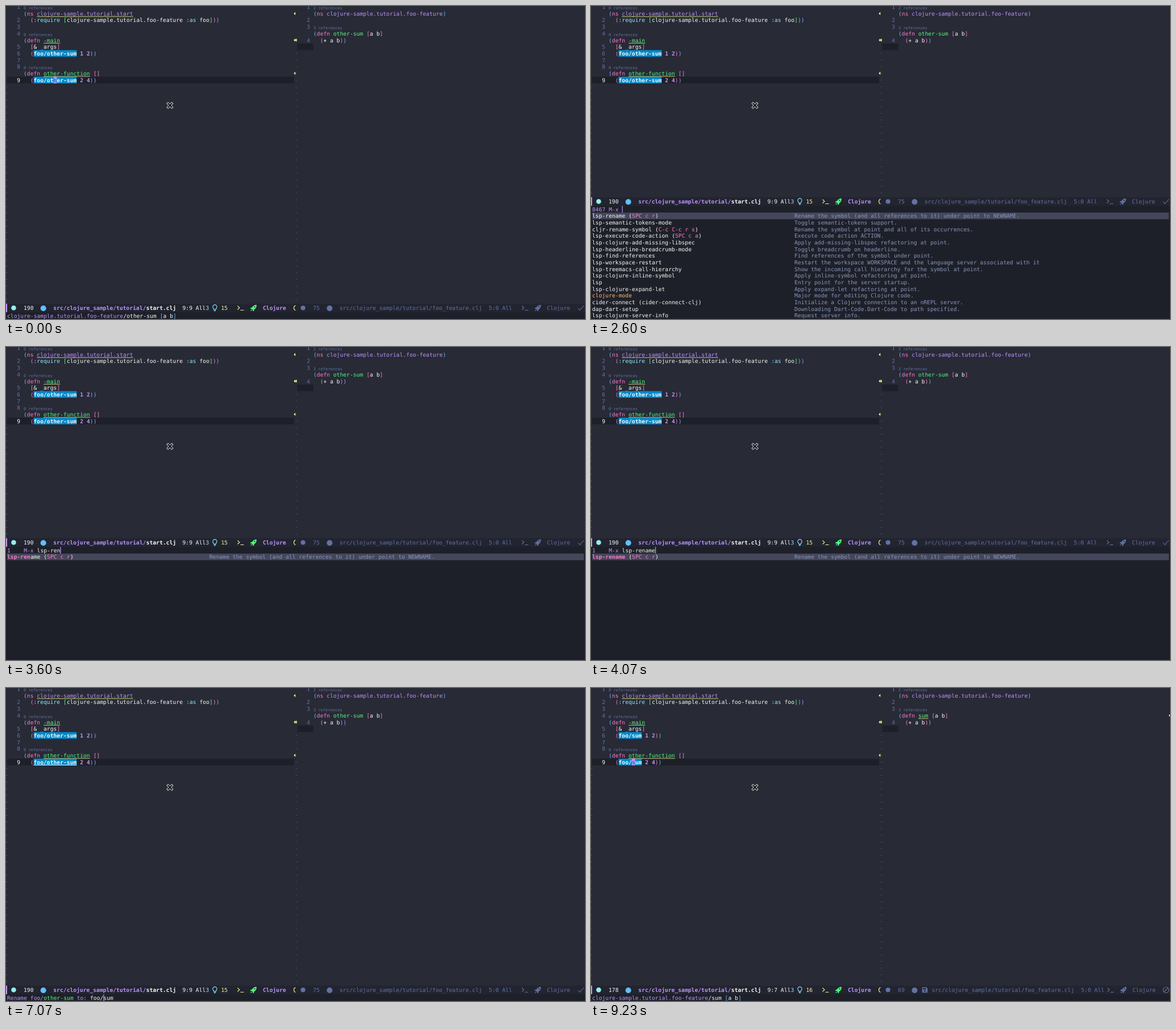
Recreate the animation shown at these times as an HTML page with a canvas. Size 1019 by 550 pixels, loop 9810 ms.

```html
<!DOCTYPE html>
<html lang="en">
<head>
<meta charset="utf-8">
<title>Renaming a symbol</title>
<style>
html, body { margin: 0; width: 100%; height: 100%; overflow: hidden; background: #282a36; }
canvas { display: block; }
</style>
</head>
<body>
<canvas id="stage" width="1019" height="550"></canvas>
<script>
const ctx = document.getElementById('stage').getContext('2d');
const LOOP = 9810, CW = 5.84, ROW = 11.68, SIZE = 9.7;
const LEFT = 31, RIGHT = 541, DOC = 358;
const BG = '#282a36', DARK = '#1e2029', BAR = '#222430', MATCH = '#0189cc';
const COLORS = {
  w: '#f8f8f2', u: '#bd93f9', p: '#ff79c6', g: '#50fa7b', c: '#8be9fd', b: '#61bfff',
  y: '#f1fa8c', o: '#ffb86c', s: '#6272a4', d: '#8995bb', m: MATCH
};
const rowY = k => 1.6 + k * ROW;

function rect(x, y, w, h, color) {
  ctx.fillStyle = color;
  ctx.fillRect(x, y, w, h);
}

function disc(x, y, r, color) {
  ctx.fillStyle = color;
  ctx.beginPath();
  ctx.arc(x, y, r, 0, 7);
  ctx.fill();
}

// Markup: ^ plus a colour letter starts a run; an upper-case letter makes it bold.
function text(x, y, markup, size = SIZE) {
  for (const run of markup.split('^').slice(1)) {
    const code = run[0], lower = code.toLowerCase(), str = run.slice(1);
    ctx.font = `${code === lower ? '' : 'bold '}${size}px "DejaVu Sans Mono", monospace`;
    ctx.fillStyle = COLORS[lower];
    ctx.fillText(str, x, y + 3.5);
    x += str.length * CW;
  }
}

function shape(x, y, path, color, filled) {
  ctx.save();
  ctx.translate(x, y);
  ctx.fillStyle = ctx.strokeStyle = color;
  ctx.lineWidth = 1.1;
  const p = new Path2D(path);
  filled ? ctx.fill(p, 'evenodd') : ctx.stroke(p);
  ctx.restore();
}

const ROCKET = 'M5.5-5.5C1-5.5-1-3.5-2.5-1L-5-.5-5.5 1.5-3 1.5-1.2 3.2-1.2 5.5 .8 5 1.3 2.5C4 1 5.5-1 5.5-5.5Z' +
  'M2-3.4a1.1 1.1 0 1 0 .1 0ZM-3.5 2.5-5.5 5.5-2.3 4Z';
const BULB = 'M-1.8 2.5C-2 1-3.6 .3-3.6-1.8A3.6 3.6 0 0 1 3.6-1.8C3.6 .3 2 1 1.8 2.5ZM-1.8 4H1.8M-1 5.4H1';
const FLOPPY = 'M-4.7-4.7H2.7L4.7-2.7V4.7H-4.7ZM-3.2-3.2V-.8H2V-3.2ZM0 .6a1.5 1.5 0 1 0 .1 0Z';
const CHECK = 'M-5 .5-2 4 5-4';
const BAN = 'M5 0A5 5 0 1 1-5 0 5 5 0 1 1 5 0ZM-3.5 3.5 3.5-3.5';
const PROMPT = 'M-5-3.5-1.5-.3-5 3M0 4H6';

function lens(x, k, n) {
  text(x, rowY(k) + .7, `^s${n} references`, 7.05);
}

function underline(x, k, chars) {
  ctx.globalAlpha = .75;
  rect(x, rowY(k) + 4.9, chars * CW, 1, COLORS.y);
  ctx.globalAlpha = 1;
}

function fringeMark(x, k) {
  shape(x, rowY(k) - .1, 'M-1.6 0 1.3-2.8V2.8Z', COLORS.y, true);
}

function lineNumbers(x, rows, current) {
  rows.forEach((k, i) => text(x - 2 * CW, rowY(k), `^${k === current ? 'w' : 's'}${i + 1}`));
}

function tildes(x, firstRow, bottom) {
  for (let k = firstRow; rowY(k) < bottom - 5; k++) rect(x, rowY(k) - .4, 2.4, 1, '#4c5064');
}

function call(k, name, args) {
  const x = LEFT + 3 * CW;
  rect(x, rowY(k) - ROW / 2, (name.length + 4) * CW, ROW, MATCH);
  text(LEFT, rowY(k), `^w  ^p(^Wfoo/${name}^w ^U${args}^p)^b)`);
}

function leftPane(s, bottom) {
  rect(2, rowY(11) - ROW / 2, 505, ROW, DARK);
  lineNumbers(LEFT, [0, 2, 3, 4, 6, 7, 8, 9, 11], 11);
  for (const k of [0, 4, 9]) lens(LEFT, k, 0);
  text(LEFT, rowY(1), '^b(^pns ^uclojure-sample.tutorial.start');
  text(LEFT, rowY(2), '^w  ^p(^c:require ^g[^wclojure-sample.tutorial.foo-feature ^c:as ^wfoo^g]^p)^b)');
  text(LEFT, rowY(5), '^b(^pdefn ^g-main');
  text(LEFT, rowY(6), '^w  ^p[^w& _args^p]');
  call(7, s.name, '1 2');
  text(LEFT, rowY(10), '^b(^pdefn ^gother-function ^p[]');
  call(11, s.name, '2 4');
  underline(LEFT + 4 * CW, 1, 29);
  underline(LEFT + 6 * CW, 5, 5);
  underline(LEFT + 6 * CW, 10, 14);
  if (s.renaming) rect(LEFT + 3 * CW, 135, 13 * CW, 1, COLORS.w);
  if (s.col) {
    const x = LEFT + s.col * CW;
    rect(x, rowY(11) - ROW / 2, CW, ROW, COLORS.u);
    text(x, rowY(11), '^M' + `  (foo/${s.name}`[s.col]);
  }
  for (const k of [1, 5, 10]) fringeMark(508, k);
  fringeMark(510.5, 5);
  tildes(0, 12, bottom);
}

function rightPane(s, bottom) {
  rect(512.5, rowY(6) - ROW / 2, 28.5, ROW, DARK);
  lineNumbers(RIGHT, [0, 2, 3, 5]);
  lens(RIGHT, 0, 2);
  lens(RIGHT, 3, 3);
  text(RIGHT, rowY(1), '^b(^pns ^uclojure-sample.tutorial.foo-feature^b)');
  text(RIGHT, rowY(4), `^b(^pdefn ^g${s.name} ^p[^wa b^p]`);
  text(RIGHT, rowY(5), '^w  ^p(^w+ a b^p)^b)');
  if (s.checked) {
    underline(RIGHT + 6 * CW, 4, 3);
    fringeMark(1018.3, 4);
  }
  tildes(509.8, 7, bottom);
}

function modeLines(s, top) {
  const y = top + 7.5, done = s.name === 'sum', slate = COLORS.s;
  const shift = done ? 1 : 0;
  rect(0, top, 1019, 15, BAR);
  rect(0, top, 2, 15, COLORS.u);
  disc(13.5, y, 4.3, '#94efee');
  text(31, y, `^w${done ? 178 : 190}`);
  disc(65.7, y + .7, 5, COLORS.b);
  text(83.3, y, '^Usrc/clojure_sample/tutorial/^Wstart.clj');
  text(310.5, y, `^w9:${s.column} All^c3`);
  shape(367.5, y, BULB, COLORS.c);
  text(378.5, y, `^y${s.checked ? 16 : 15}`);
  shape(412.5, y, PROMPT, COLORS.y);
  shape(435.5, y + .3, ROCKET, COLORS.g, true);
  text(452, y, '^UClojure');
  shape(511, y, 'M-1.5-4.2A4.5 4.5 0 0 0-1.5 4.2', COLORS.y);

  disc(522.7, y, 4.1, slate);
  text(540.3, y, `^s${done ? 69 : 75}`);
  disc(569.5, y + .7, 5, slate);
  if (done) shape(587.5, y, FLOPPY, slate, true);
  const x = done ? 599.7 : 587;
  text(x, y, '^ssrc/clojure_sample/tutorial/foo_feature.clj');
  text(x + 45 * CW, y, '^s5:0 All');
  shape(913 + shift, y, PROMPT, slate);
  shape(936 + shift, y + .3, ROCKET, slate, true);
  text(952 + shift, y, '^sClojure');
  shape(1012, y, done ? BAN : CHECK, slate);
}

// The mouse pointer: a dark cross with a pale outline.
function pointer() {
  ctx.lineCap = 'square';
  for (const [width, color] of [[4, '#e8e8e8'], [2.2, '#101014']]) {
    ctx.strokeStyle = color;
    ctx.lineWidth = width;
    ctx.stroke(new Path2D('M285.2 171.3 291.8 177.9M291.8 171.3 285.2 177.9'));
  }
  ctx.lineCap = 'butt';
}

const RENAME = ['lsp-rename|SPC c r', 'Rename the symbol (and all references to it) under point to NEWNAME.'];
const TOKENS = ['lsp-semantic-tokens-mode', 'Toggle semantic-tokens support.'];
const SHARED = [
  ['lsp-execute-code-action|SPC c a', 'Execute code action ACTION.'],
  ['lsp-clojure-add-missing-libspec', 'Apply add-missing-libspec refactoring at point.'],
  ['lsp-headerline-breadcrumb-mode', 'Toggle breadcrumb on headerline.'],
  ['lsp-find-references', 'Find references of the symbol under point.'],
  ['lsp-workspace-restart', 'Restart the workspace WORKSPACE and the language server associated with it'],
  ['lsp-treemacs-call-hierarchy', 'Show the incoming call hierarchy for the symbol at point.'],
  ['lsp-clojure-inline-symbol', 'Apply inline-symbol refactoring at point.'],
  ['lsp', 'Entry point for the server startup.'],
  ['lsp-clojure-expand-let', 'Apply expand-let refactoring at point.']
];
const INFO = ['lsp-clojure-server-info', 'Request server info.'];
const ALL = [
  RENAME, TOKENS,
  ['cljr-rename-symbol|C-c C-c r s', 'Rename the symbol at point and all of its occurrences.'],
  ...SHARED,
  ['clojure-mode', 'Major mode for editing Clojure code.'],
  ['cider-connect (cider-connect-clj)', 'Initialize a Clojure connection to an nREPL server.'],
  ['dap-dart-setup', 'Downloading Dart-Code.Dart-Code to path specified.'],
  INFO
];
const LSP = [
  TOKENS, ...SHARED, INFO,
  ['lsp-describe-thing-at-point', 'Display the type signature and documentation of the thing at'],
  ['lsp-lens-mode', 'Toggle code-lens overlays.'],
  ['lsp-log-io-mode', 'Special mode for viewing IO logs.'],
  ['lsp-install-server', 'Interactively install server.'],
  ['lsp-treemacs-symbols', 'Show symbols view.']
];
const ACTIVE = ['clojure-mode', 'lsp-lens-mode'];

function candidates(s, y) {
  rect(2, y + (s.selected + .5) * ROW, 1015, ROW, '#44475a');
  s.list.forEach(([label, doc], i) => {
    const [name, key] = label.split('|'), n = s.input.length;
    const color = ACTIVE.includes(name) ? 'o' : 'w';
    const lineY = y + (i + 1) * ROW;
    text(2, lineY, `^P${name.slice(0, n)}^${color}${name.slice(n)}` + (key ? `^w (^p${key}^w)` : ''));
    text(DOC, lineY, '^d' + doc);
  });
}

const echo = name => `^uclojure-sample.tutorial.foo-feature^w/${name} ^b[^wa b^b]`;
const idle = (col = 9) => ({ col, column: col, mini: echo('other-sum') });
const menu = (count, input, list, selected = 0) => ({
  input, list, selected, mini: `^u${String(count).padEnd(5)}M-x ^w${input}`, caret: 9 + input.length
});
const rename = (input, caret) => ({
  renaming: true, mini: `^uRename foo/^gother-sum^u to: ^w${input}`, caret: 25 + caret
});
const renamed = (mini, checked) => ({ name: 'sum', col: 7, column: 7, mini, checked });
const APPLYING = "^wLSP :: Applying 1 edits to `foo_feature.clj' ...";

const STATES = [
  [0, idle()],
  [800, idle(8)],
  [1070, idle()],
  [2600, menu(8467, '', ALL)],
  [3070, menu(238, 'lsp', LSP, 8)],
  [3600, menu(1, 'lsp-ren', [RENAME])],
  [4070, menu(1, 'lsp-rename', [RENAME])],
  [5070, rename('foo/other-sum', 13)],
  [5570, rename('foo/other-sum', 12)],
  [6070, rename('foo/other-sum', 10)],
  [6570, rename('foo/othsum', 7)],
  [7070, rename('foo/sum', 4)],
  [8070, renamed(APPLYING)],
  [8670, renamed(APPLYING + 'done', true)],
  [9230, renamed(echo('sum'), true)]
];

function draw(now) {
  const t = now % LOOP;
  const s = { name: 'other-sum', column: 9, ...STATES.findLast(([start]) => start <= t)[1] };
  const miniTop = s.list ? 351 : 538, barTop = miniTop - 15, y = miniTop + 6.1;
  ctx.textRendering = 'geometricPrecision';
  rect(0, 0, 1019, 550, BG);
  leftPane(s, barTop);
  rightPane(s, barTop);
  pointer();
  modeLines(s, barTop);
  rect(0, miniTop, 1019, 550 - miniTop, DARK);
  if (s.list) candidates(s, y);
  text(2, y, s.mini);
  if (s.caret) rect(2 + s.caret * CW, miniTop + .3, 1.2, ROW, COLORS.u);
  requestAnimationFrame(draw);
}
requestAnimationFrame(draw);
</script>
</body>
</html>
```
